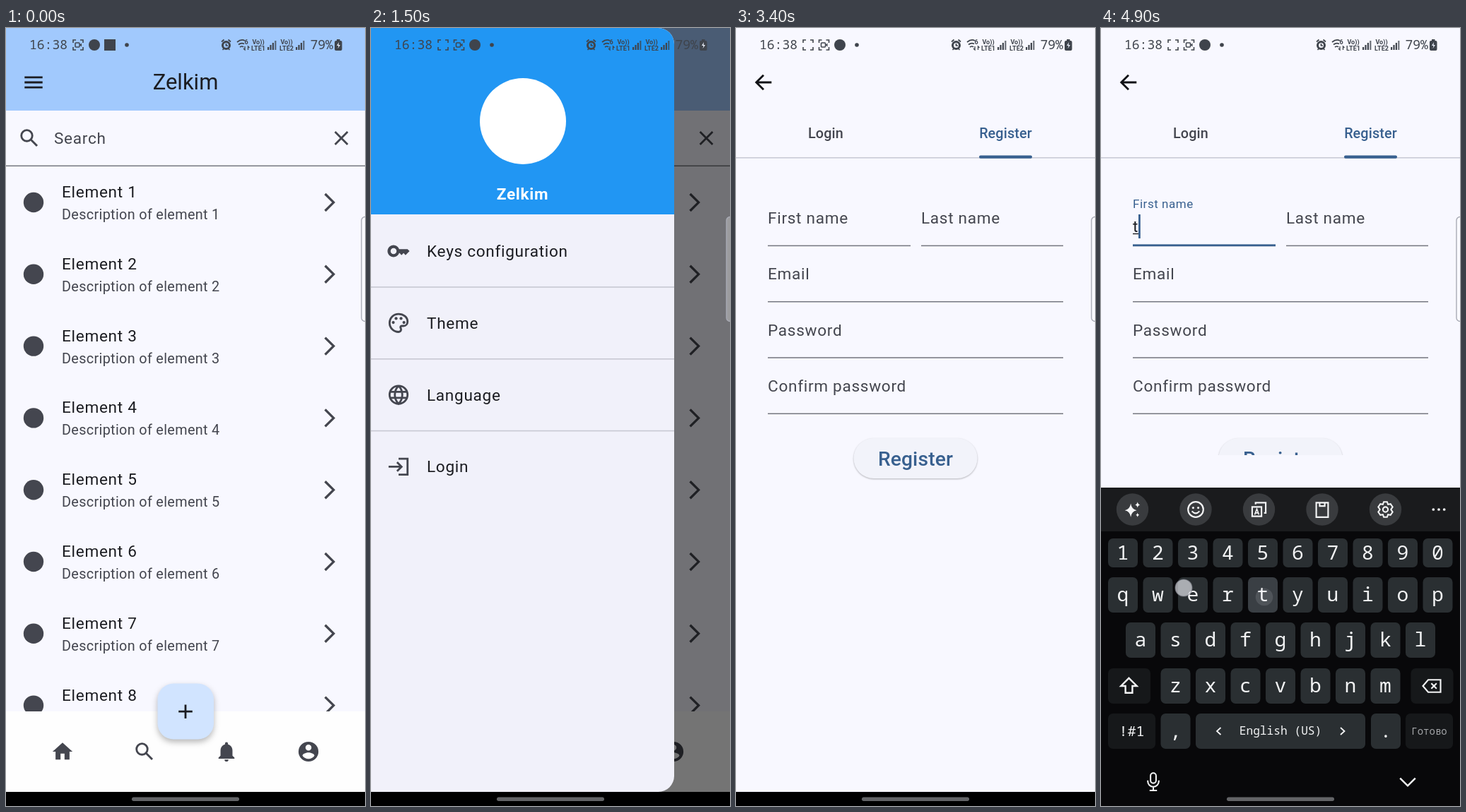
Recreate the animation shown at these times as an HTML page. Size 508 by 1102 pixels, loop 5000 ms.

```html
<!DOCTYPE html>
<html lang="en">
<head>
<meta charset="utf-8">
<title>Key manager walkthrough</title>
<style>
  html, body { margin: 0; width: 100%; height: 100%; overflow: hidden; background: #000; }
  svg { display: block; width: 100vw; height: 100vh; font-family: Roboto, sans-serif; }
  .mono { font-family: "Noto Sans Mono", "DejaVu Sans Mono", monospace; }
  .raised { filter: drop-shadow(0 1.5px 1.2px rgba(0, 0, 0, .28)); }
  .fab { filter: drop-shadow(0 4px 4px rgba(0, 0, 0, .28)); }
</style>
</head>
<body>
<svg id="stage" viewBox="0 0 508 1102"></svg>
<script>
const APP = 'Zelkim';
const INK = '#1b1c21', SOFT = '#44464f', BLUE = '#38608f', PAGE = '#f8f8ff', LINE = '#74767e';
const LOOP = 5000, STEP = 100;

const rect = (x, y, w, h, fill, more = '') =>
  `<rect x="${x}" y="${y}" width="${w}" height="${h}" fill="${fill}" ${more}/>`;
const circle = (x, y, r, fill, more = '') =>
  `<circle cx="${x}" cy="${y}" r="${r}" fill="${fill}" ${more}/>`;
const text = (x, y, s, size, fill = INK, more = '') =>
  `<text x="${x}" y="${y}" font-size="${size}" fill="${fill}" ${more}>${s}</text>`;
const rule = (x1, x2, y, color = LINE, w = 1.5) =>
  rect(x1, y - w / 2, x2 - x1, w, color);
const group = (id, body, more = '') => `<g id="${id}" ${more}>${body}</g>`;
const body16 = 'letter-spacing=".7"', body14 = 'letter-spacing=".35"';
const mid = 'text-anchor="middle"', medium = 'font-weight="500" letter-spacing=".14"';

// Icons live on a 24-unit grid.
const pen = (d, w = 2) => `<path d="${d}" fill="none" stroke="currentColor" stroke-width="${w}"/>`;
const solid = d => `<path d="${d}" fill="currentColor" fill-rule="evenodd"/>`;
const ring = (x, y, r, w = 2) =>
  circle(x, y, r, 'none', `stroke="currentColor" stroke-width="${w}"`);
const dots = (r, ...pts) => pts.map(([x, y]) => circle(x, y, r, 'currentColor')).join('');
const ICONS = {
  menu: pen('M3 7H21M3 12H21M3 17H21'),
  search: ring(9.5, 9.5, 5.5) + pen('M13.8 13.8L19.8 19.8', 2.1),
  close: pen('M5.7 5.7L18.3 18.3M18.3 5.7L5.7 18.3'),
  home: solid('M10 20v-6h4v6h5v-8h3L12 3 2 12h3v8z'),
  bell: solid('M12 22a2 2 0 0 0 2-2h-4a2 2 0 0 0 2 2zM18 16v-5c0-3-1.6-5.6-4.5-6.3V4a1.5 1.5 0 0 0-3 0v.7C7.6 5.4 6 8 6 11v5l-2 2v1h16v-1z'),
  account: solid('M2 12a10 10 0 1 0 20 0a10 10 0 1 0-20 0M9 8a3 3 0 1 1 6 0a3 3 0 1 1-6 0M6 16c0-2 4-3.1 6-3.1s6 1.1 6 3.1a7.2 7.2 0 0 1-12 0z'),
  next: solid('M6.2 20.2L8 22 18 12 8 2 6.2 3.8 14.5 12z'),
  back: pen('M20 12H5M12 4.7L4.7 12L12 19.3'),
  key: solid('M21 10h-8.4a6 6 0 1 0 0 4H13l2 2 2-2 2 2 4-4zM4 12a3 3 0 1 1 6 0a3 3 0 1 1-6 0'),
  palette: pen('M12 3a9 9 0 0 0 0 18c1.4 0 2.5-1.1 2.5-2.5 0-1.4-.6-1.3-.6-2s.6-1.5 1.5-1.5H17c2.4 0 4-2 4-4.5C21 6.3 17 3 12 3z') +
    dots(1.5, [6.7, 11.5], [9.5, 7.5], [14.5, 7.5], [17.4, 11.5]),
  globe: ring(12, 12, 9) + pen('M3.5 9H20.5M3.5 15H20.5M12 3C7 8 7 16 12 21C17 16 17 8 12 3'),
  login: pen('M2 12H14M10.5 7.5L15 12L10.5 16.5M12 4H21V20H12'),
  spark: solid('M10 5Q11 12 17 13Q11 14 10 21Q9 14 3 13Q9 12 10 5zM18 3Q18.5 6 21 6.5Q18.5 7 18 10Q17.5 7 15 6.5Q17.5 6 18 3zM18 16Q18.4 18 20 18.5Q18.4 19 18 21Q17.6 19 16 18.5Q17.6 18 18 16z'),
  smile: ring(12, 12, 9, 1.8) + dots(1.3, [9, 10], [15, 10]) + pen('M7.5 14Q12 19 16.5 14', 1.8),
  translate: pen('M4 9H15V20H4zM8 6V4H20V16H18', 1.8) + pen('M7 18L9.5 11.5L12 18M8 16H11', 1.4),
  clip: pen('M5 4H19V21H5zM9 4V8H15V4', 1.8),
  gear: ring(12, 12, 3, 1.8) + pen('M10 3H14L15 6L18 5.5L20.5 9L18.5 12L20.5 15L18 18.5L15 18L14 21H10L9 18L6 18.5L3.5 15L5.5 12L3.5 9L6 5.5L9 6z', 1.7),
  more: dots(1.7, [5, 12], [12, 12], [19, 12]),
  shift: pen('M12 4L20 12H15.5V19H8.5V12H4z', 1.7),
  erase: pen('M8 5H22V19H8L2 12zM11.5 9L17.5 15M17.5 9L11.5 15', 1.7),
  mic: pen('M12 3a3 3 0 0 0-3 3V11a3 3 0 0 0 6 0V6a3 3 0 0 0-3-3zM6 11v1a6 6 0 0 0 12 0V11M12 18V22M8 22H16', 1.6),
  down: pen('M4 8L12 16L20 8', 1.8)
};
const icon = (name, x, y, color = SOFT, k = 1.412) =>
  `<g color="${color}" transform="translate(${x - 12 * k} ${y - 12 * k}) scale(${k})">${ICONS[name]}</g>`;

function homeScreen() {
  let rows = '';
  for (let i = 0; i < 8; i++) {
    const y = 247 + i * 101.8;
    rows += circle(39, y, 14.2, SOFT) +
      text(79, y - 7, `Element ${i + 1}`, 22.6, INK, body16) +
      text(79, y + 24, `Description of element ${i + 1}`, 19.8, SOFT, body14) +
      icon('next', 458, y, SOFT, 1.32);
  }
  return rect(0, 0, 508, 1082, PAGE) + rect(0, 0, 508, 117, '#a1c9fd') +
    icon('menu', 39, 77, INK) + text(254, 87, APP, 31, INK, mid) +
    icon('search', 33, 156) + text(68, 164, 'Search', 22.6, SOFT, body16) + icon('close', 474.5, 156) +
    rule(0, 508, 195.3) + rows + rect(0, 968, 508, 114, '#fefefe') +
    ['home', 'search', 'bell', 'account'].map((n, i) => icon(n, 80 + i * 116, 1025)).join('') +
    rect(214.5, 928.5, 79.5, 79, '#d1e4ff', 'rx="22.6" class="fab"') +
    `<path d="M254 958.5V978M244.2 968.2H263.8" stroke="${INK}" stroke-width="2.8"/>`;
}

function drawer() {
  const items = [['key', 'Keys configuration'], ['palette', 'Theme'], ['globe', 'Language'], ['login', 'Login']];
  return `<path d="M0 0H406.4a22.6 22.6 0 0 1 22.6 22.6V1059.4a22.6 22.6 0 0 1-22.6 22.6H0z" fill="#f1f1fa"/>
    <path d="M0 0H406.4a22.6 22.6 0 0 1 22.6 22.6V264H0z" fill="#2196f3"/>` +
    circle(215, 132, 61, '#fff') +
    text(214.5, 243, APP, 22.6, '#fff', mid + ' font-weight="700" ' + body16) +
    group('tileInk', rect(0, 572, 429, 101, 'rgba(40,45,60,.09)')) +
    items.map(([n, s], i) => {
      const y = 316 + i * 101.8;
      return icon(n, 39, y) + text(79, y + 8, s, 22.6, INK, body16) + (i < 3 ? rule(0, 429, y + 51, '#c8c9d3', 1.6) : '');
    }).join('');
}

const button = (x, y, w, s) =>
  rect(x, y, w, 57, '#f2f3fa', 'rx="28.5" class="raised"') +
  text(x + w / 2, y + 38.5, s, 28.2, BLUE, mid + ' ' + medium);
const field = (x1, x2, row, s, id = '') =>
  text(x1, 277 + row * 79.3, s, 22.6, SOFT, body16 + id) + rule(x1, x2, 308.4 + row * 79.3);

function authScreen() {
  const loginForm = field(45, 463, 0, 'Email') + field(45, 463, 1, 'Password') + button(184, 422.5, 140, 'Login');
  const registerForm = field(45, 247, 0, 'First name', ' id="firstLabel"') + field(262, 463, 0, 'Last name') +
    ['Email', 'Password', 'Confirm password'].map((s, i) => field(45, 463, i + 1, s)).join('') +
    button(166.5, 581, 175, 'Register') +
    group('focusLine', rule(45, 247, 307.8, BLUE, 2.8)) +
    group('typed', text(45, 289, 't', 22.6, INK) + rule(45, 53, 291.5, INK, 1.4)) +
    rect(45, 264, 2.8, 34, BLUE, 'id="caret"');
  return rect(0, 0, 508, 1082, PAGE) + icon('back', 39, 77, '#111216') +
    rect(254, 117, 254, 67, 'rgba(55,65,95,.075)', 'id="tabInk"') +
    text(127, 156, 'Login', 19.8, BLUE, `id="tabA" ${mid} ${medium}`) +
    text(381.5, 156, 'Register', 19.8, SOFT, `id="tabB" ${mid} ${medium}`) +
    rule(0, 508, 183.8, '#c8c9d3') + rect(102, 180.6, 50, 4.2, BLUE, 'id="bar" rx="2"') +
    `<clipPath id="view">${rect(45, 220, 418, 862, '#000', 'id="viewBox"')}</clipPath>
    <g clip-path="url(#view)">${group('formA', loginForm)}${group('formB', registerForm)}</g>`;
}

function keyboard() {
  const KEY = '#2a2f32', DARK = '#16181a', WHITE = '#f3f4f5';
  const key = (x, y, w, s, h = 50, fill = KEY, size = 28, color = WHITE, id = '') =>
    rect(x, y, w, h, fill, `rx="7" ${id}`) +
    text(x + w / 2, y + h / 2 + size * .33, s, size, color, mid);
  const row = (chars, x, y, h) => [...chars].map((c, i) =>
    key(x + i * 49.5, y, 42, c, h, KEY, 28, WHITE, c === 't' ? 'id="tKey"' : '')).join('');
  return rect(0, 0, 508, 460, '#08080a') + rect(0, 0, 508, 62, '#1a1b1d') +
    ['spark', 'smile', 'translate', 'clip', 'gear'].map((n, i) =>
      circle(44.5 + i * 89.5, 31, 22.7, '#393b3e') + icon(n, 44.5 + i * 89.5, 31, WHITE, 1.2)).join('') +
    icon('more', 478, 31, WHITE, 1.1) +
    row('1234567890', 10, 72, 41) + row('qwertyuiop', 10, 127, 50) +
    row('asdfghjkl', 35, 191, 50) + row('zxcvbnm', 84.5, 256, 50) +
    key(10, 256, 60, '', 50, DARK) + icon('shift', 39.5, 281, WHITE, 1.4) +
    key(438.5, 256, 60, '', 50, DARK) + icon('erase', 468, 281, WHITE, 1.25) +
    key(10, 320, 67, '!#1', 50, DARK, 20) + key(84.5, 320, 42, ',') +
    key(134, 320, 240, 'English (US)', 50, KEY, 16.2) +
    `<path d="M169.500 340L164 345L169.500 350M339 340L344.500 345L339 350" fill="none" stroke="${WHITE}" stroke-width="1.8"/>` +
    key(382, 320, 42, '.') + key(431, 320, 67, 'Готово', 50, DARK, 14, '#a3a5a8');
}

function statusBar() {
  const C = '#3f444c';
  const frame = x => `<path d="M${x - 7} 21v-4h4m6 0h4v4m0 6v4h-4m-6 0h-4v-4" fill="none" stroke="${C}" stroke-width="1.6"/>`;
  const cam = x => rect(x - 4, 21, 6, 6, 'none', `stroke="${C}" stroke-width="1.5" rx="1"`) +
    `<path d="M${x + 2} 24l3-2.500v5z" fill="${C}"/>`;
  const bars = x => [0, 1, 2, 3].map(i =>
    rect(x + i * 3.4, 27 - i * 3, 2.2, 4 + i * 3, C, i > 2 ? 'opacity=".75"' : '')).join('');
  const lte = (x, n) => text(x, 22.5, 'Vo))', 9, C, mid + ' font-weight="700"') +
    text(x, 31.500, 'LTE' + n, 9, C, mid + ' font-weight="700"');
  return text(33, 30, '16:38', 18, C, 'class="mono"') + frame(102) + group('camA', cam(102)) +
    group('trayA', circle(125, 24, 8, C) + rect(139, 16, 16, 16, C)) +
    group('trayB', frame(124.5) + cam(124.5) + circle(147, 24, 8, C)) + circle(171, 24, 2.8, C) +
    circle(311.5, 24.5, 5, 'none', `stroke="${C}" stroke-width="3"`) +
    `<path d="M305 19.500l3.500-3M318 19.500l-3.500-3M306.500 31l2-2M316.500 31l-2-2M311.500 22v3h2.500" stroke="${C}" stroke-width="1.700" fill="none"/>
    <path d="M327 20q6-5 11-2M329 23.500q4-3 8-1M331 27q3-2 5 0" stroke="${C}" stroke-width="1.700" fill="none"/>` +
    text(337.5, 23, '6', 9, C, 'font-weight="700"') +
    `<path d="M338 26v5l-2-2M342.500 31v-5l2 2" stroke="${C}" stroke-width="1.300" fill="none"/>` +
    lte(357, 1) + bars(370) + lte(397, 2) + bars(410) +
    text(430.5, 30, '79%', 18, C, 'class="mono"') +
    rect(465, 18, 10.5, 14, C, 'rx="2"') + rect(468, 16, 4.5, 3, C) +
    '<path d="M471 20l-3 5h2.500l-1 4l3.500-5h-2.500z" fill="#e8edf8"/>';
}

document.getElementById('stage').innerHTML =
  rect(0, 0, 508, 1102, '#000') + homeScreen() +
  rect(0, 0, 508, 1082, '#000', 'id="scrim"') + group('drawer', drawer()) + group('auth', authScreen()) +
  rect(503, 267.5, 12, 148, 'rgba(255,255,255,.3)', 'rx="5" stroke="#a9abb5" stroke-width="1.4"') +
  rect(0, 1082, 508, 20, '#000') + group('keys', keyboard(), 'class="mono"') +
  group('keyNav', icon('mic', 74, 1067, '#f3f4f5', 1.3) + icon('down', 434, 1068, '#f3f4f5', 1.35)) +
  rect(178, 1089.5, 152, 5.5, '#636467', 'rx="2.7"') +
  group('status', statusBar()) + group('touches', '');

const $ = id => document.getElementById(id);
const set = (id, attrs) => { for (const k in attrs) $(id).setAttribute(k, attrs[k]); };
const fade = (id, a) => set(id, { opacity: a });
const show = (id, on) => fade(id, on ? 1 : 0);
const clamp = v => Math.min(1, Math.max(0, v));
const span = (t, from, length) => clamp((t - from) / length);
const out = (u, power) => 1 - (1 - u) ** power;
const lerp = (a, b, p) => a + (b - a) * p;
const move = (id, x, y) => set(id, { transform: `translate(${x} ${y})` });
const mix = (from, to, p) => `color-mix(in srgb, ${to} ${p * 100}%, ${from})`;

// x, y, start time of every tap
const TAPS = [[42, 70, 700], [120, 622, 1700], [385, 152, 2700], [93, 301, 3700], [231, 806, 4700], [117, 793, 4900]];
const TAP_ALPHA = [.65, .55, .12];

function draw(t) {
  show('trayA', t < 200);
  show('trayB', t >= 200);
  show('camA', t < 200 || (t >= 2100 && t < 2600));

  const open = out(span(t, 870, 300), 2);
  fade('scrim', .54 * open);
  move('drawer', -430 * (1 - open), 0);
  show('tileInk', t >= 1700 && t < 2200);

  const enter = span(t, 1850, 300), zoom = lerp(.85, 1, out(enter, 3));
  fade('auth', clamp(enter * 3));
  set('auth', { transform: `translate(254 541) scale(${zoom}) translate(-254 -541)` });

  const tab = out(span(t, 2717, 300), 2.36), stretch = 52 * tab * (1 - tab);
  const left = lerp(102, 344, tab) - stretch, right = lerp(152, 419, tab) + stretch;
  set('bar', { x: left, width: right - left });
  $('tabA').style.fill = mix(BLUE, SOFT, tab);
  $('tabB').style.fill = mix(SOFT, BLUE, tab);
  fade('tabInk', t < 2700 ? 0 : clamp((3200 - t) / 300));
  move('formA', -418 * tab, 0);
  move('formB', 418 * (1 - tab), 0);

  const focus = span(t, 3700, 200);
  set('firstLabel', { y: lerp(277, 255, focus), 'font-size': lerp(22.6, 17, focus), 'letter-spacing': lerp(.7, .53, focus) });
  $('firstLabel').style.fill = mix(SOFT, BLUE, focus);
  fade('focusLine', focus);
  const typed = t >= 4800;
  show('typed', typed);
  show('caret', typed || (t >= 3800 && t < 4300));
  set('caret', { x: typed ? 53 : 45 });

  const top = lerp(1102, 651, out(span(t, 3830, 200), 3));
  move('keys', 0, top);
  show('keyNav', top < 1102);
  set('viewBox', { height: Math.min(1082, top - 46) - 220 });
  set('tKey', { fill: t >= 4700 ? '#3a3f44' : '#2a2f32' });

  $('touches').innerHTML = TAPS.map(([x, y, start]) => {
    const a = t < start ? 0 : TAP_ALPHA[(t - start) / STEP] || 0;
    return a ? circle(x, y, 12, `rgba(240,241,248,${a})`, `stroke="rgba(120,122,132,${a})" stroke-width="1.2"`) : '';
  }).join('');
}

let last = -1;
function tick() {
  const t = Math.floor(performance.now() % LOOP / STEP) * STEP;
  if (t !== last) draw(last = t);
  requestAnimationFrame(tick);
}
tick();
</script>
</body>
</html>
```
